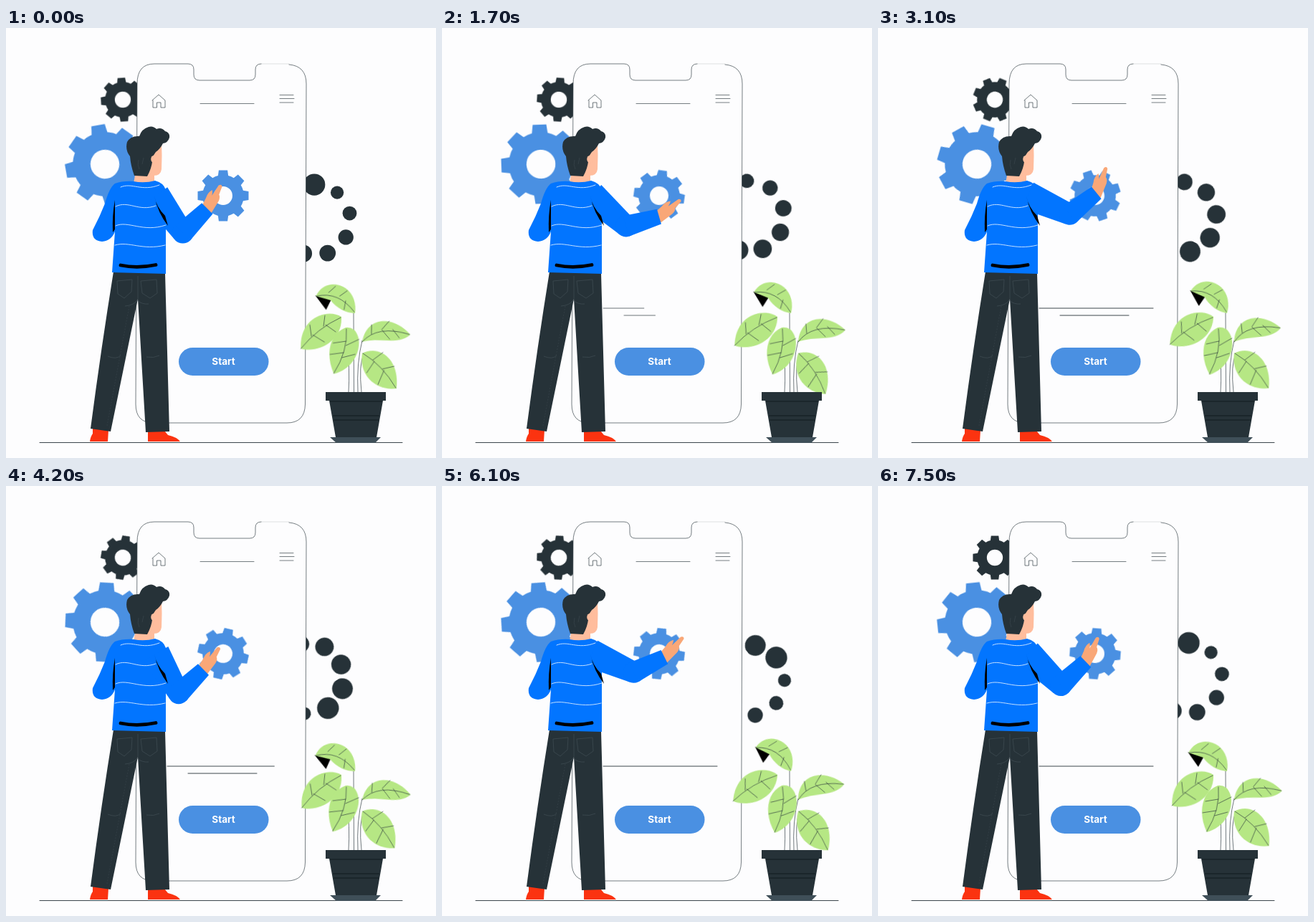
These frames come from a looping animation (600 px wide and 600 px high, 7700 ms). An HTML page:

```html
<!DOCTYPE html>
<html lang="en">
<head>
<meta charset="utf-8">
<title>Start screen</title>
<style>
  @property --upper { syntax: "<angle>"; inherits: true; initial-value: 0deg; }
  @property --fore { syntax: "<angle>"; inherits: true; initial-value: 0deg; }
  @property --hand { syntax: "<angle>"; inherits: true; initial-value: 0deg; }

  html, body { margin: 0; width: 100%; height: 100%; overflow: hidden; background: #fdfdfe; }
  svg { display: block; width: 100vw; height: 100vh; --t: 0; --shift: 0; }
  .dark { fill: #263238; }
  .blue { fill: #4a90e2; }
  .knit { fill: #0275ff; }
  .skin { fill: #f9a777; }
  .face { fill: #ffbd9d; }
  .shoe { fill: #fb3310; }
  .leaf { fill: #b6e784; }
  .line { fill: none; stroke: #263238; stroke-width: .9; stroke-linecap: round; stroke-linejoin: round; }
  .thin { stroke-width: .65; }
  .soft { opacity: .7; }
  .wave { fill: none; stroke: #d9eaff; stroke-width: .9; stroke-linecap: round; }
  .seam { fill: none; stroke: #46535a; stroke-width: .6; }
  text { font: 700 13.5px Inter, "Open Sans", sans-serif; fill: #fff; text-anchor: middle; }

  /* Every animation is paused; the script moves the clock --t (ms). */
  .spin, .row, .sway, .arm {
    animation-play-state: paused;
    animation-iteration-count: infinite;
    animation-delay: calc((var(--t) + var(--shift)) * -1ms);
  }
  .spin { animation-name: spin; animation-duration: 7700ms; animation-timing-function: cubic-bezier(.6, .6, .75, .9); }
  @keyframes spin { to { transform: rotate(-360deg); } }

  .row { animation-duration: 7700ms; animation-timing-function: linear; transform-origin: 225px 0; }
  #row1 { animation-name: row1; }
  #row2 { animation-name: row2; transform-origin: 254px 0; }
  @keyframes row1 {
    0%, 14% { transform: scaleX(0); }
    36.5%, 52%, 78%, 100% { transform: none; }
    65% { transform: scaleX(.69); }
  }
  @keyframes row2 {
    0%, 15.5%, 63.5%, 100% { transform: scaleX(0); }
    30%, 56% { transform: none; }
  }

  .sway {
    animation-name: sway; animation-duration: 1925ms; animation-direction: alternate;
    animation-timing-function: cubic-bezier(.37, 0, .63, 1);
  }
  @keyframes sway {
    from { transform: rotate(var(--lo)); }
    to { transform: rotate(var(--hi)); }
  }

  .arm {
    animation-name: upper, fore, hand;
    animation-duration: 3850ms;
    animation-delay: calc((var(--t) + 770) * -1ms), calc((var(--t) + 3696) * -1ms), calc((var(--t) + 2426) * -1ms);
    transform: translate(209px, 234px) rotate(var(--upper));
  }
  .fore { transform: translate(64px, 0) rotate(calc(var(--fore) - var(--upper))); }
  .hand { transform: translate(48px, 0) rotate(calc(var(--hand) - var(--fore))); }
  @keyframes upper {
    0%, 78%, 100% { --upper: 24deg; animation-timing-function: ease-in-out; }
    28%, 50% { --upper: 60deg; animation-timing-function: ease-in-out; }
  }
  @keyframes fore {
    0%, 100% { --fore: -45deg; animation-timing-function: ease-in-out; }
    40% { --fore: -16deg; animation-timing-function: ease-out; }
  }
  @keyframes hand {
    0%, 100% { --hand: -37deg; animation-timing-function: ease-in; }
    45% { --hand: -71deg; animation-timing-function: linear; }
  }
</style>
</head>
<body>
<svg id="stage" viewBox="0 0 600 600">
  <g id="dots" class="dark spin" style="transform-origin: 426.5px 267px"></g>
  <g class="dark" transform="translate(163 100) rotate(-4)"><path id="cog" class="spin" fill-rule="evenodd"/></g>
  <g class="blue" transform="translate(138 190) rotate(-10)"><path id="wheel" class="spin" fill-rule="evenodd"/></g>
  <path class="line" d="M47 578.5H553"/>

  <!-- phone -->
  <path fill="#fdfdfe" d="M183 78Q183 50 207 50H254Q262 50 262 58V65Q262 73 270 73H340Q348 73 348 65V58Q348 50 356 50H395Q419 50 419 78L417.500 525Q417 551 392 551H206Q181 551 181 525Z"/>
  <path class="line soft" d="M395 51Q419 53 419 78L417.500 525Q417 551 392 551H206Q181 551 181 525L183 78Q183 50 207 50H254Q262 50 262 58V65Q262 73 270 73H340Q348 73 348 65V58Q348 50 356 50"/>
  <path class="line" opacity=".15" d="M356 50H395"/>
  <path class="line soft" d="M271 105.500H346M382 93.500H401M382 98.500H402M382 104H401"/>
  <path class="line thin" d="M204 101L213 93L222 101V111H216V104H210.500V111H205V101"/>
  <path id="row1" class="line row" d="M225 391H384"/>
  <path id="row2" class="line row" d="M254 401H350"/>
  <g class="blue" transform="translate(303 234)"><path id="gear" class="spin" fill-rule="evenodd"/></g>
  <rect class="blue" x="241" y="446" width="125.500" height="39" rx="19.500"/>
  <text x="303.500" y="469.500">Start</text>

  <!-- shoes and trousers -->
  <path class="shoe" d="M121 558L143 561L142 577H117Q118 570 121 566Z"/>
  <path class="shoe" d="M198 562H221L226 568Q239 571 243 577H198Z"/>
  <path class="dark" d="M150 340L222 342L228 563L195 564L184 378L146 563L118 559Q133 445 150 340Z"/>
  <path class="seam" d="M155 353L176 351L175 368L165 377L156 371ZM188 353L210 351L211 370L201 377L190 370ZM184 346V378M142 458Q154 463 160 457M196 459Q206 461 214 457M166 388Q178 387 183 380Q190 386 199 385"/>
  <path class="seam" stroke-dasharray="2 2" opacity=".6" d="M172 388L141 555"/>

  <!-- torso and head -->
  <path class="face" d="M181 200L207 198V217H178Z"/>
  <path class="face" d="M203 166L217 160Q218 178 217 197Q216 206 206 206H196Z"/>
  <path class="dark" d="M179 206Q174 192 173 179Q166 170 169 159Q174 150 186 151Q189 141 199 138Q205 136 210 141Q217 138 222 144Q229 146 228 153Q226 160 219 161Q215 169 209 173L205 179Q204 192 200 201L197 207Z"/>
  <path class="seam" opacity=".7" d="M185 184Q183 191 186 197M192 181L190 190"/>
  <ellipse class="face" cx="206.500" cy="183" rx="4.300" ry="5.200"/>
  <path class="knit" d="M178 214Q193 217 208 213Q220 216 223 226L223 343L148 341L152 284Q147 297 134 298Q119 297 121 282Q131 263 138 245Q144 223 152 217Q164 213 178 214Z"/>
  <path d="M152 240Q148 261 149 285L152 281Z"/>
  <path d="M160 331Q183 336 209 330.500" fill="none" stroke="#000" stroke-width="4.800" stroke-linecap="round"/>
  <g class="arm">
    <path class="knit" d="M0-20L64-14.800V14.800L0 20Z"/>
    <g class="fore">
      <path class="skin hand" d="M-5-8L12-9Q20-11 26-7Q23-4.500 19-3.500L36-2.500Q40 0 37 2.500L25 4.500Q23 8 17 8.500L-5 8Z"/>
      <circle class="knit" r="14.800"/>
      <path class="knit" d="M0-14.800L48-10.800V10.800L0 14.800Z"/>
    </g>
  </g>
  <path d="M207 235Q212 258 226 276L222 262Q210 250 207 235Z"/>
  <path class="wave" d="M160 222C176 215 189 229 214 219M153 249C171 240 185 257 209 248M153 276C170 268 191 286 223 275M152 303C172 297 190 311 222 303"/>

  <!-- plant -->
  <path class="line thin" d="M478 508Q480 480 476 430M485.500 508L485 397M491 508Q489 468 497 436M496 508Q492 470 499 455"/>
  <g class="sway" style="transform-origin: 487px 398px; --lo: -6deg; --hi: 7.5deg; --shift: 3275">
    <path d="M433 370L455 377L447 391Z"/>
    <path class="leaf" d="M434 371C441 357 456 353 468 358C482 363 491 379 487 398C475 397 462 390 454 378Z"/>
    <path class="line thin" d="M435 371Q466 366 486 396M452 367L462 359M467 373L478 366M475 380L472 392"/>
  </g>
  <g class="sway" style="transform-origin: 468px 404px; --lo: -2.5deg; --hi: 7.5deg; --shift: 3275">
    <path class="leaf" d="M468 403C450 391 409 402 411 447C436 454 470 436 468 403Z"/>
    <path class="line thin" d="M411 447Q434 419 467 404M426 430L424 414M443 416L445 401M428 428L444 438M446 414L460 424"/>
  </g>
  <g class="sway" style="transform-origin: 497px 438px; --lo: -6deg; --hi: 8deg; --shift: 1325">
    <path class="leaf" d="M497 438C500 403 535 396 563 422C548 439 520 429 497 438Z"/>
    <path class="line thin" d="M497 438Q516 412 562 422M509 426L508 413M523 418L532 406M523 419L535 431M538 417L548 428"/>
  </g>
  <g class="sway" style="transform-origin: 497px 454px; --lo: 0deg; --hi: 12deg; --shift: 425">
    <path class="leaf" d="M497 454C520 441 550 460 546 502C513 506 493 481 497 454Z"/>
    <path class="line thin" d="M498 454Q526 470 545 501M512 463L526 452M526 475L542 471M514 465L504 481M528 477L520 497"/>
  </g>
  <g class="sway" style="transform-origin: 474px 418px; --lo: 3deg; --hi: -5deg; --shift: 3275">
    <path class="leaf" d="M474 418C450 428 447 458 459 483C492 474 501 436 486 421Q480 417 474 418Z"/>
    <path class="line thin" d="M475 420Q478 451 459 482M475 437L457 440M472 453L453 456M475 443L493 434M470 460L488 455"/>
  </g>
  <path fill="#3f4f58" d="M452 571H523L515 579H461Z"/>
  <path class="dark" d="M446 508H530V520H526L517 571H460L451 520H446Z"/>
  <path d="M452 521H525M456 541H521M457 547H520" fill="none" stroke="#0e171b" stroke-width=".9"/>
</svg>
<script>
const LOOP = 7700, STEP = 100, LAST = 7500;
const el = id => document.getElementById(id);

function gearPath(size) {
  const teeth = 8, root = size * .8, hole = size * .36;
  const p = (r, a) => `${r * Math.sin(a)} ${-r * Math.cos(a)}`;
  let d = '';
  for (let i = 0; i < teeth; i++) {
    const a = i * 2 * Math.PI / teeth;
    d += (i ? `A${root} ${root} 0 0 1 ` : 'M') + p(root, a - .25)
      + `L${p(size, a - .17)}L${p(size, a + .17)}L${p(root, a + .25)}`;
  }
  d += `A${root} ${root} 0 0 1 ${p(root, -.25)}Z`;
  return d + `M${hole} 0A${hole} ${hole} 0 1 0 ${-hole} 0A${hole} ${hole} 0 1 0 ${hole} 0Z`;
}

el('cog').setAttribute('d', gearPath(31));
el('wheel').setAttribute('d', gearPath(56));
el('gear').setAttribute('d', gearPath(36));

// A ring of nine dots: the first is the largest, the rest grow steadily.
el('dots').innerHTML = Array.from({ length: 9 }, (_, i) => {
  const a = (i * 40 - 91) * Math.PI / 180;
  const r = i ? 8.4 + i * .75 : 15.2;
  return `<circle cx="${431 + 49.4 * Math.cos(a)}" cy="${268 + 49.4 * Math.sin(a)}" r="${r}"/>`;
}).join('');

const start = performance.now();
function tick() {
  const t = Math.max(0, performance.now() - start) % LOOP;
  el('stage').style.setProperty('--t', Math.min(LAST, Math.floor(t / STEP) * STEP));
  requestAnimationFrame(tick);
}
tick();
</script>
</body>
</html>
```
